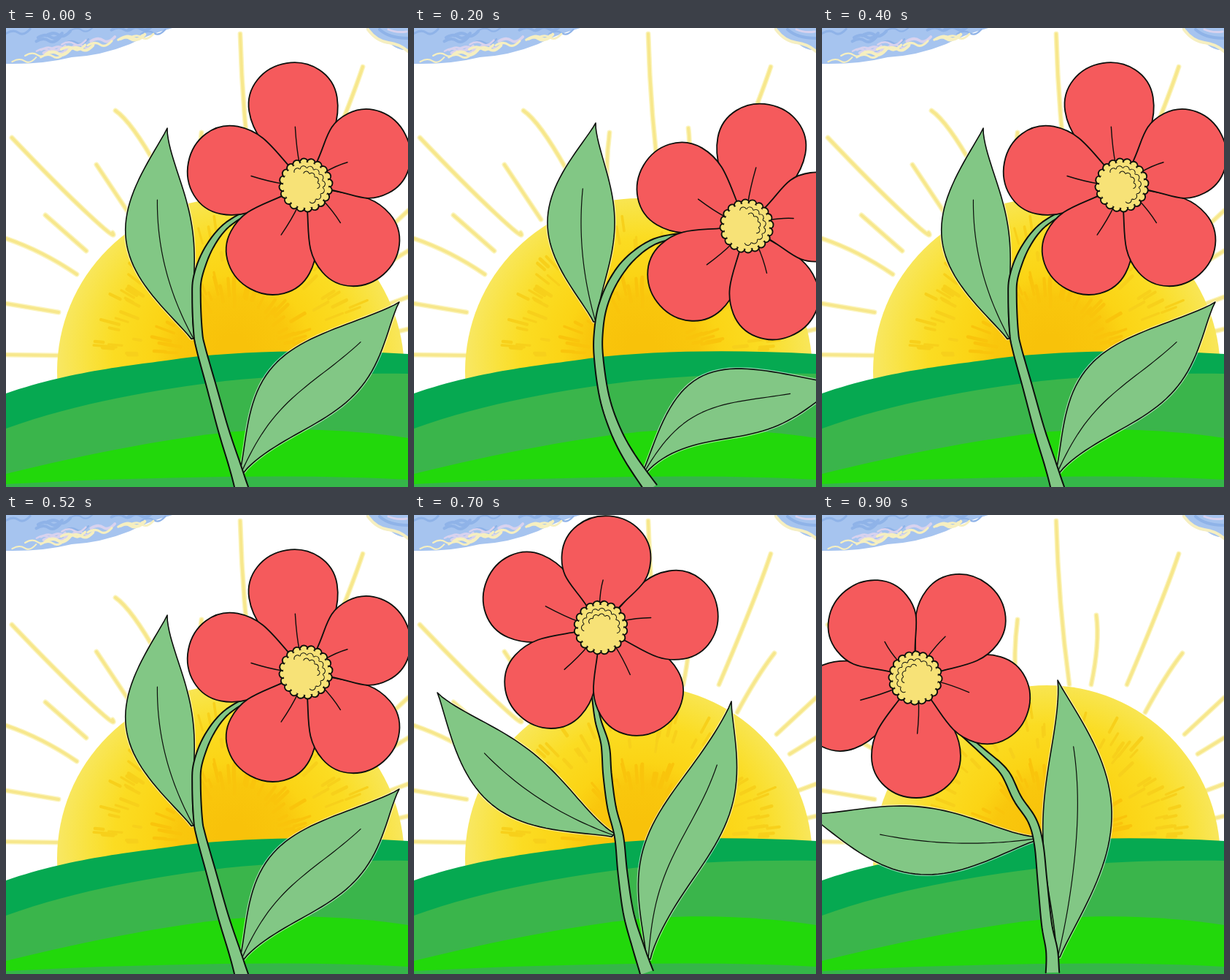
An HTML page with a canvas that plays this animation: 551 by 628 pixels, repeating every 1000 ms.

```html
<!DOCTYPE html>
<html lang="en">
<head>
<meta charset="utf-8">
<title>Swaying flower</title>
<style>
  html, body { margin: 0; width: 100%; height: 100%; overflow: hidden; background: #fff; }
  canvas { display: block; }
</style>
</head>
<body>
<canvas id="stage" width="551" height="628"></canvas>
<script>
const W = 551, H = 628, TAU = Math.PI * 2;
const stage = document.getElementById('stage').getContext('2d');
const INK = '#0c0f0c', RED = '#f55a5c', LEAF = '#82c785', SEED = '#f7e277';

// Leaves: tip, base, bend of the spine, S-curve of the spine, half width.
// Stem: centre line from the head to the ground.
const POSES = {
  right: {
    head: [411, 215, 49],
    leftLeaf: [221, 137, 257, 425, -29, 0, 46],
    rightLeaf: [539, 375, 323, 607, -13, 8, 52],
    stem: [[332, 251], [300, 272], [277, 303], [263, 340], [261, 370], [263, 415], [267, 438], [282, 492], [298, 550], [314, 600], [323, 630]]
  },
  farRight: {
    head: [456, 271, 68.5],
    leftLeaf: [249, 130, 249, 402, -20, 0, 46],
    rightLeaf: [588, 488, 316, 607, -38, 10, 48],
    stem: [[373, 282], [330, 292], [297, 315], [274, 345], [259, 380], [253, 415], [253, 450], [261, 505], [276, 550], [296, 588], [325, 630]]
  },
  middle: {
    head: [323, 158, 0],
    leftLeaf: [74, 218, 295, 429, -10, 0, 45],
    rightLeaf: [472, 313, 325, 607, -3, 9, 46],
    stem: [[301, 238], [300, 280], [301, 320], [297, 370], [301, 425], [303, 480], [305, 530], [309, 568], [317, 600], [322, 630]]
  },
  left: {
    head: [256, 154, -9.5],
    leftLeaf: [32, 243, 273, 438, -27, 0, 45],
    rightLeaf: [435, 255, 321, 607, -4, 11, 45],
    stem: [[246, 243], [252, 280], [262, 315], [265, 355], [271, 400], [281, 440], [286, 490], [294, 545], [307, 590], [319, 626]]
  },
  fartherLeft: {
    head: [180, 177, -25],
    leftLeaf: [-4, 316, 271, 448, -20, 0, 47],
    rightLeaf: [375, 232, 324, 604, 3, 9, 48],
    stem: [[194, 268], [212, 305], [233, 340], [246, 385], [262, 420], [283, 455], [291, 500], [299, 550], [311, 592], [318, 626]]
  },
  farLeft: {
    head: [128, 223, -52.5],
    leftLeaf: [-22, 408, 292, 443, -20, 0, 46],
    rightLeaf: [323, 226, 323, 605, 27, 2, 47],
    stem: [[185, 293], [222, 325], [250, 352], [268, 388], [288, 418], [297, 450], [302, 500], [308, 560], [315, 596], [316, 626]]
  }
};
const SLOW = ['right', 'farRight', 'right'];
const FAST = ['middle', 'left', 'fartherLeft', 'farLeft'];
const poseAt = ms => ms < 600 ? SLOW[Math.floor(ms / 200)] : FAST[Math.floor((ms - 600) / 100)];

function randomizer(seed) {
  return () => (seed = (seed * 16807) % 2147483647) / 2147483647;
}

function fill(c, color, d) {
  c.fillStyle = color;
  c.fill(new Path2D(d));
}

function stroke(c, color, width, path) {
  c.strokeStyle = color;
  c.lineWidth = width;
  c.stroke(typeof path === 'string' ? new Path2D(path) : path);
}

function polyline(points, closed) {
  const path = new Path2D();
  points.forEach(([x, y]) => path.lineTo(x, y));
  if (closed) path.closePath();
  return path;
}

const sample = (from, to, count, fn) =>
  Array.from({ length: count + 1 }, (_, i) => fn(from + (to - from) * i / count));

function drawSun(c) {
  const rays = [
    'M8 150Q70 215 112 254T146 280', 'M150 113Q172 128 208 192L236 236', 'M124 187L174 262',
    'M54 256L110 305', 'M0 288Q50 305 97 337', 'M0 377L72 389', 'M0 447L70 448',
    'M321 8Q324 120 339 232', 'M489 53Q470 110 418 232', 'M376 137Q381 175 369 232',
    'M268 143Q262 190 266 236', 'M494 189Q470 220 443 270', 'M551 250L497 300',
    'M551 305L515 327', 'M551 368L524 378', 'M551 412L538 415'
  ];
  for (const ray of rays) {
    stroke(c, '#fbf4bd', 7, ray);
    stroke(c, '#f7e78c', 4, ray);
  }
  const glow = c.createRadialGradient(312, 440, 20, 312, 455, 238);
  [[0, '#f8c20a'], [.26, '#f9c70d'], [.4, '#fbd415'], [.66, '#fbdc22'], [.82, '#f9e23e'], [1, '#f8e760']]
    .forEach(([at, color]) => glow.addColorStop(at, color));
  c.fillStyle = glow;
  c.beginPath();
  c.ellipse(308, 470, 238, 237, 0, 0, TAU);
  c.fill();

  const random = randomizer(77);
  const dabs = (count, near, far, color) => {
    for (let i = 0; i < count; i++) {
      const a = Math.PI * (1 + random()), r = near + (far - near) * random(), len = 10 + 16 * random();
      const x = 312 + r * Math.cos(a), y = 448 + r * Math.sin(a);
      stroke(c, color, 3 + 2 * random(), `M${x} ${y}l${len * Math.cos(a)} ${len * Math.sin(a)}`);
    }
  };
  dabs(70, 125, 180, '#f7d01b');
  dabs(45, 65, 95, '#f9c40c');
}

function drawClouds(c) {
  fill(c, '#a6c4ef', 'M0 0H228Q195 9 170 22Q130 38 90 40Q50 50 0 49Z');
  fill(c, '#a6c4ef', 'M494 0Q506 20 527 22Q540 32 551 30V0Z');
  const random = randomizer(31);
  const wisps = (count, color, low, high) => {
    for (let i = 0; i < count; i++) {
      const x = random() * 190, y = (48 - x * .2) * (low + (high - low) * random());
      stroke(c, color, 2 + 2.5 * random(), `M${x} ${y}q10 -6 17 -1t16 -5`);
    }
  };
  wisps(9, '#8fb3e8', .1, .8);
  wisps(7, '#d8d2ee', .55, .95);
  wisps(10, '#f6efc0', .85, 1.08);
  stroke(c, '#f6efc0', 4, 'M496 2Q508 18 524 20T551 32');
  stroke(c, '#8fb3e8', 4, 'M512 2Q525 14 551 14');
  stroke(c, '#d8d2ee', 3, 'M524 2Q535 7 549 5');
}

function drawHills(c) {
  fill(c, '#06a951', 'M0 500C95 467 190 460 240 452C330 441 440 440 551 446V628H0Z');
  fill(c, '#3ab54b', 'M0 548C100 512 210 494 300 483C380 475 460 472 551 473V628H0Z');
  fill(c, '#22d80b', 'M0 610C110 583 240 557 330 551C420 546 490 552 551 561V628H0Z');
  fill(c, '#35b649', 'M0 624Q150 616 300 614T551 618V628H0Z');
}

function makeBackdrop() {
  const canvas = document.createElement('canvas');
  canvas.width = W;
  canvas.height = H;
  const c = canvas.getContext('2d');
  c.lineCap = 'round';
  c.fillStyle = '#fff';
  c.fillRect(0, 0, W, H);
  drawSun(c);
  drawClouds(c);
  drawHills(c);
  return canvas;
}

function drawLeaf([x0, y0, x1, y1, bend, sway, half], ribStart) {
  const dx = x1 - x0, dy = y1 - y0, len = Math.hypot(dx, dy);
  const at = (u, side) => {
    const width = half * Math.max(0, Math.sin(Math.PI * u)) ** 1.2 + 3 * u ** 6;
    const n = (4 * bend * u * (1 - u) + sway * Math.sin(TAU * u) + side * width) / len;
    return [x0 + dx * u + dy * n, y0 + dy * u - dx * n];
  };
  const outline = polyline([
    ...sample(0, 1, 40, u => at(u, 1)),
    ...sample(1, 0, 40, u => at(u, -1))
  ], true);
  stroke(stage, 'rgba(255,255,255,.5)', 4, outline);
  stage.fillStyle = LEAF;
  stage.fill(outline);
  stroke(stage, INK, 1.6, outline);
  stroke(stage, INK, 1.2, polyline(sample(ribStart, 1, 30, u => at(u, 0))));
}

function spline(points, u) {
  const last = points.length - 1, i = Math.min(last - 1, Math.floor(u * last)), t = u * last - i;
  const p = k => points[Math.max(0, Math.min(last, i + k))];
  return [0, 1].map(axis => {
    const [a, b, c, d] = [p(-1), p(0), p(1), p(2)].map(q => q[axis]);
    return b + t / 2 * (c - a + t * (2 * a - 5 * b + 4 * c - d + t * (3 * (b - c) + d - a)));
  });
}

function drawStem(points) {
  const edge = side => sample(0, 1, 70, u => {
    const [x, y] = spline(points, u);
    const [ax, ay] = spline(points, Math.max(0, u - .01)), [bx, by] = spline(points, Math.min(1, u + .01));
    const half = side * (2.5 + 3.2 * Math.min(1, u * 4) + 3.6 * u ** 4) / Math.hypot(bx - ax, by - ay);
    return [x + (by - ay) * half, y - (bx - ax) * half];
  });
  const one = edge(1), other = edge(-1);
  stage.fillStyle = LEAF;
  stage.fill(polyline([...one, ...other.slice().reverse()], true));
  for (const side of [one, other]) stroke(stage, INK, 2, polyline(side));
}

function drawPetal(angle, r, veinEnd) {
  stage.save();
  stage.rotate(angle * TAU / 360);
  const petal = new Path2D(`M26 -20C55 -42 ${r - 34} -61 ${r} -61C${r + 33} -61 ${r + 57} -33 ${r + 57} 0
    C${r + 57} 33 ${r + 33} 61 ${r} 61C${r - 34} 61 55 42 26 20Z`);
  stage.fillStyle = RED;
  stage.fill(petal);
  stroke(stage, INK, 1.8, petal);
  stroke(stage, INK, 1.4, `M30 -4Q50 -5 ${veinEnd} -2`);
  stage.restore();
}

function drawSeeds() {
  const ring = (count, r, size, from, to) => {
    for (let i = 0; i < count; i++) {
      const a = from + (to - from) * i / count;
      stage.beginPath();
      stage.arc(r * Math.cos(a), r * Math.sin(a), size, a - 1.3, a + 1.3);
      stage.stroke();
    }
  };
  stage.fillStyle = SEED;
  stage.beginPath();
  stage.arc(0, 0, 34, 0, TAU);
  stage.fill();
  stage.strokeStyle = INK;
  stage.lineWidth = 1.9;
  for (let i = 0; i < 20; i++) {
    const a = TAU * i / 20;
    stage.beginPath();
    stage.arc(31 * Math.cos(a), 31 * Math.sin(a), 5.6, a - 1.5, a + 1.5);
    stage.fill();
    stage.stroke();
  }
  stage.lineWidth = 1;
  ring(9, 22, 4.5, 3.3, 7);
  ring(4, 15, 4, 3.9, 6);
}

function drawHead([x, y, turn]) {
  stage.save();
  stage.translate(x, y);
  stage.rotate(turn * TAU / 360);
  [[212, 112, 81], [142, 107, 76], [69, 104, 76], [0, 105, 70], [-76, 96, 65]]
    .forEach(petal => drawPetal(...petal));
  drawSeeds();
  stage.restore();
}

const backdrop = makeBackdrop();
stage.lineJoin = stage.lineCap = 'round';
let shown;

function render() {
  const name = poseAt(performance.now() % 1000);
  if (name !== shown) {
    const pose = POSES[name];
    stage.drawImage(backdrop, 0, 0);
    drawLeaf(pose.leftLeaf, .33);
    drawLeaf(pose.rightLeaf, .24);
    drawStem(pose.stem);
    drawHead(pose.head);
    shown = name;
  }
  requestAnimationFrame(render);
}
render();
</script>
</body>
</html>
```
